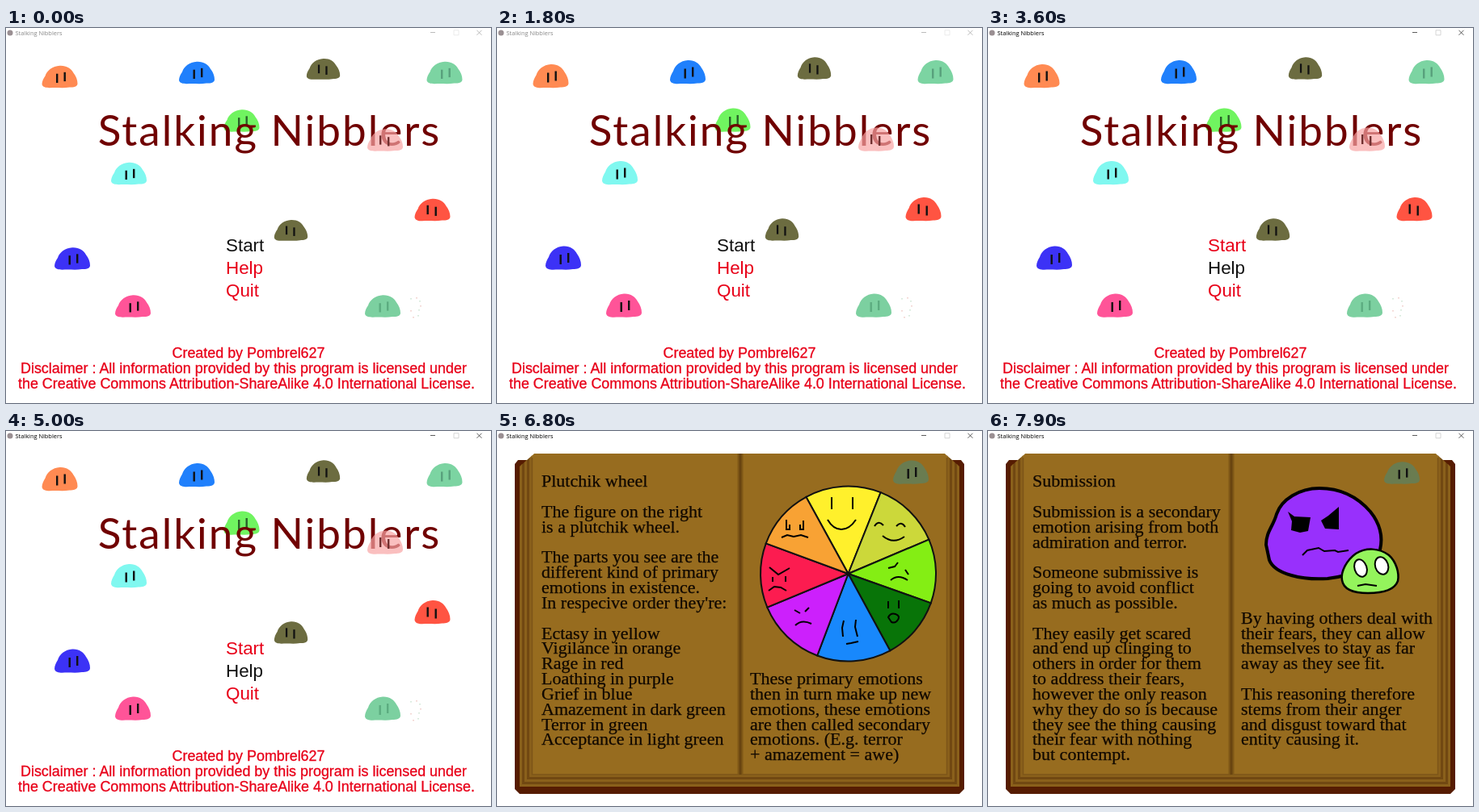
Recreate the animation shown at these times as an HTML page. Size 600 by 465 pixels, loop 8 s.

```html
<!DOCTYPE html>
<html lang="en">
<head>
<meta charset="utf-8">
<title>Stalking Nibblers</title>
<style>
  html, body { margin: 0; width: 100%; height: 100%; overflow: hidden; background: #fff; }
  svg { display: block; width: 600px; height: 465px; }
  text { white-space: pre; }
  #bar text { font: 7.4px "Open Sans", sans-serif; fill: #000; }
  #bar path { fill: none; stroke: #333; stroke-width: .8; }
  #bar .off { stroke: #ccc; }
  #bar.idle text { fill: #888; }
  #bar.idle path { stroke: #aaa; }
  #bar.idle .off { stroke: #e6e6e6; }
  .title { font: 400 53px Lato, sans-serif; letter-spacing: 2px; fill: #700000; }
  .item { font: 22.4px "Liberation Sans", Arial, sans-serif; }
  .note { font: 17.9px "Liberation Sans", Arial, sans-serif; fill: #e80018; stroke: #e80018; stroke-width: .3; }
  .page text { font: 22px "Liberation Serif", Times, serif; fill: #100800; stroke: #100800; stroke-width: .25; }
  .line { fill: none; stroke: #000; stroke-width: 2; }
</style>
</head>
<body>
<svg id="stage" viewBox="0 0 600 465"></svg>
<script>
const LOOP = 8000, BREATH = 660;
const FOCUS = 2700, HELP = 3100, BOOK = 5300, WHEEL = 6400, SUBMIT = 7400;
const stage = document.getElementById('stage');

const BODY = 'M-22-6C-22-10-20-14-18-17C-16-24-9-30 0-30.5C8-31 14-27 17-21' +
  'C20-17 22-12 22-7C22-3 17-2 12-2C6-1 0-1.5-6-1.5C-12-1.5-21 0-22-6Z';

// x is the middle, y the ground line; side -1 looks to the left
function critter(x, y, color, side = 1, eye = '#111', alpha = 1) {
  const left = side > 0 ? [-4.5, -20] : [-7, -22];
  const right = side > 0 ? [5, -22] : [3, -20];
  const bar = ([ex, ey]) => `<rect x="${ex}" y="${ey}" width="2.4" height="12" fill="${eye}"/>`;
  return `<g transform="translate(${x} ${y})"><g class="critter">
    <path d="${BODY}" fill="${color}" fill-opacity="${alpha}"/>${bar(left)}${bar(right)}</g></g>`;
}

const olive = (x, y) => `<g transform="translate(${x} ${y}) scale(.94)">${critter(0, 0, '#6c6c40', -1)}</g>`;

function lines(x, first, text) {
  return text.split('|').map((s, i) =>
    `<text x="${x}" y="${69.3 + 18.83 * (first + i)}">${s}</text>`).join('');
}

const page = (id, left, first, right, art = '') =>
  `<g class="page" id="${id}">${lines(55, 0, left)}${lines(313, first, right)}${art}</g>`;

function bar() {
  return `<g id="bar"><circle cx="5" cy="6" r="3.5" fill="#9a8f92"/>
    <text x="11.5" y="9">Stalking Nibblers</text>
    <path d="M525 5.5h6M582.5 2.8l6 6m0-6l-6 6"/>
    <path class="off" d="M554 2.8h6v6h-6z"/></g>`;
}

function menu() {
  const dots = [[500, 335], [507, 334], [511, 338], [512, 344], [510, 349],
    [500, 350], [509, 356], [503, 358]].map(([x, y], i) =>
    `<rect x="${x}" y="${y}" width="2" height="1.5" fill="${i % 2 ? '#f3d6d2' : '#d8eadc'}"/>`).join('');
  return `<g id="menu">
    ${critter(66.5, 75.5, '#ff8a52')}${critter(236, 70.5, '#2080fc')}
    ${olive(392.5, 65)}${critter(542.5, 70.5, '#7cd4a2', 1, '#58a07c')}
    ${critter(291.5, 130, '#70f460', 1, '#286028')}
    ${critter(152, 195.5, '#80f8f0')}${critter(527.5, 240.5, '#ff5442', -1)}
    ${olive(352.5, 265)}${critter(82, 301, '#3c32f6')}
    ${critter(157, 360, '#ff5498')}${critter(466, 360, '#7cd0a0', 1, '#5cac80')}${dots}
    <text class="title" x="326" y="146" text-anchor="middle">Stalking Nibblers</text>
    ${critter(469, 154, '#f8a4a4', -1, '#703030', .7)}
    <text class="item" id="start" x="272" y="277">Start</text>
    <text class="item" id="help" x="272" y="305">Help</text>
    <text class="item" fill="#e80018" x="272" y="333">Quit</text>
    <text class="note" x="300" y="409" text-anchor="middle">Created by Pombrel627</text>
    <text class="note" x="18" y="428">Disclaimer : All information provided by this program is licensed under</text>
    <text class="note" x="15" y="447">the Creative Commons Attribution-ShareAlike 4.0 International License.</text>
  </g>`;
}

function bookBase() {
  let s = '<path d="M26 36H574L578 41V444L572 450H28L22 444V41Z" fill="#561c02"/>';
  for (let i = 0; i < 6; i++) {
    const x = 28 + 3 * i, y = 41 - 2.6 * i;
    s += `<path d="M${x} ${y + 3}l3-3H${597 - x}l3 3V${441 - 3 * i}H${x}Z"
      fill="${i == 5 ? '#976c1f' : i % 2 ? '#714812' : '#8a601b'}"/>`;
  }
  return s + `<path d="M43.5 33V426H556.5V33" fill="none" stroke="#7d5518" stroke-width="1.5"/>
    <path d="M301 28V426" stroke="#805817" stroke-width="7"/>
    <path d="M301 28V426" stroke="#684410" stroke-width="3"/>`;
}

function wheel() {
  const cx = 434.5, cy = 177, r = 108.5;
  const angles = [-118.7, -68.3, -23, 19.6, 61.5, 110.7, 157.4, 200.3, 241.3];
  const colors = ['#fff02c', '#ccd83a', '#84ee14', '#087408', '#1888fc', '#cc20fc', '#fc1c50', '#f8a234'];
  const rim = a => `${cx + r * Math.cos(a * Math.PI / 180)} ${cy + r * Math.sin(a * Math.PI / 180)}`;
  const slices = colors.map((c, i) => `<path d="M${cx} ${cy}L${rim(angles[i])}
    A${r} ${r} 0 0 1 ${rim(angles[i + 1])}Z" fill="${c}" stroke="#111" stroke-width="2"/>`).join('');
  const faces = [
    'M414 82v15M440 82v15M409 110q7 12 17 12t18-12',
    'M467 118q5-8 11-1M494 118q6-7 11 1M477 130q13 11 27 1',
    'M484 170l8-2 4-5M505 172l4 6M487 185q9-8 21 0',
    'M484 211v9M497 210v10M484 231q3-6 9-4t3 7-8 3z',
    'M429 235l-2 9 1 11M444 234l-1 9 3 12M432 264l6-1 9-2',
    'M368 222l7 4M381 224l5-5M369 241q8-8 20-2',
    'M337 169l11 9 14-8M341 181v6M357 180v7M336 198l7-5 8 1 7 4',
    'M358 110v12h4v-6M379 111v11h-4v-6M352 132l7-3 8 2 9-2 9 3'
  ];
  return slices + `<path class="line" d="${faces.join('')}"/>`;
}

function blobs() {
  return `<path d="M344 141C344 125 353 118 357 103C363 85 385 71 410 71C440 71 460 85 473 100
      C485 115 489 130 485 147C480 165 450 180 420 183C390 185 355 178 348 160Z"
      fill="#9830fc" stroke="#000" stroke-width="4"/>
    <path d="M371 100l8 6 20 1-3 17-10 2-11-3 1-11zM412 111l9-6 13-11v28l-17-1z"/>
    <path class="line" d="M389 154l6-6 14-3 7 4 13-1 4 2 13-2"/>
    <path d="M438 185C436 174 444 160 455 152C468 144 484 145 496 154C505 162 509 176 507 186
      C503 197 488 201 470 201C454 201 440 198 438 185Z" fill="#94f45c" stroke="#000" stroke-width="2.5"/>
    <g fill="#fff" stroke="#000" stroke-width="2">
      <ellipse cx="461" cy="170" rx="7.5" ry="11" transform="rotate(-18 461 170)"/>
      <ellipse cx="487" cy="167" rx="8" ry="11" transform="rotate(-18 487 167)"/></g>
    <path class="line" d="M457 192l10-2 14 2"/>`;
}

stage.innerHTML = bar() + menu() + `<g id="book">${bookBase()}` +
  page('emotions',
    'Emotions||Emotions are a means for|two social entities to|convey a hierarchical|standing toward one|' +
    'another. Hence why|emotions, unlike logic,|needs to be validated by|external means.||' +
    'To portray this using an|example : Imagine an|angry customer yelling|at a cashier over a|mispriced item.',
    2, 'The customer in his anger,|feels a sense of|righteousness entitled|to him as he feels that|' +
    'the store wronged him.||By creating this conflict,|he is trying to correct|the social imbalance he|' +
    'sees. This by positioning|himself above the cashier,|in an effort to try to|' +
    'compensate for the lower|position he received by|the mispriced item.') +
  page('wheel',
    "Plutchik wheel||The figure on the right|is a plutchik wheel.||The parts you see are the|" +
    "different kind of primary|emotions in existence.|In respecive order they're:||" +
    'Ectasy in yellow|Vigilance in orange|Rage in red|Loathing in purple|Grief in blue|' +
    'Amazement in dark green|Terror in green|Acceptance in light green',
    13, 'These primary emotions|then in turn make up new|emotions, these emotions|' +
    'are then called secondary|emotions. (E.g. terror|+ amazement = awe)', wheel()) +
  page('submission',
    'Submission||Submission is a secondary|emotion arising from both|admiration and terror.||' +
    'Someone submissive is|going to avoid conflict|as much as possible.||They easily get scared|' +
    'and end up clinging to|others in order for them|to address their fears,|however the only reason|' +
    'why they do so is because|they see the thing causing|their fear with nothing|but contempt.',
    9, 'By having others deal with|their fears, they can allow|themselves to stay as far|' +
    'away as they see fit.||This reasoning therefore|stems from their anger|and disgust toward that|' +
    'entity causing it.', blobs()) +
  critter(512, 67, '#6a7c50') + '</g>';

const el = id => document.getElementById(id);
const show = (id, on) => el(id).style.display = on ? '' : 'none';
const critters = document.querySelectorAll('.critter');

function draw(now) {
  const t = now % LOOP, phase = t % BREATH / BREATH;
  const tall = phase > .25 && phase < .76 ? 1 : .94;
  critters.forEach(c => c.setAttribute('transform', `scale(1 ${tall})`));
  el('bar').setAttribute('class', t < FOCUS ? 'idle' : '');
  el('start').setAttribute('fill', t < HELP ? '#111' : '#e80018');
  el('help').setAttribute('fill', t < HELP ? '#e80018' : '#111');
  show('menu', t < BOOK);
  show('book', t >= BOOK);
  show('emotions', t < WHEEL);
  show('wheel', t >= WHEEL && t < SUBMIT);
  show('submission', t >= SUBMIT);
  requestAnimationFrame(draw);
}
draw(0);
</script>
</body>
</html>
```
